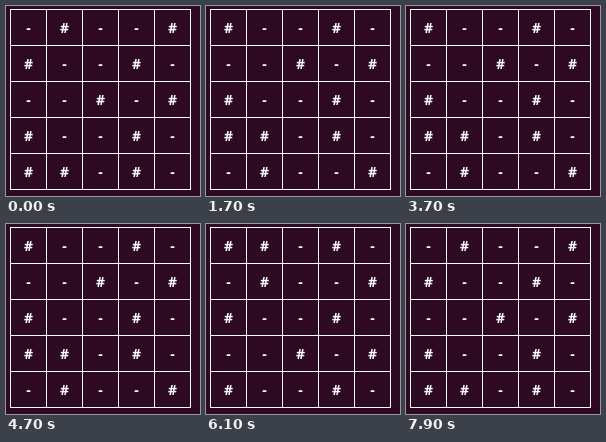
An HTML page for the animation above (8 s loop, 194 by 190 pixels).

```html
<!DOCTYPE html>
<html lang="en">
<head>
<meta charset="utf-8">
<title>Scrolling pattern</title>
<style>
  html, body { margin: 0; width: 100%; height: 100%; overflow: hidden; background: #2d0922; }
  svg { display: block; width: 194px; height: 190px; }
  path { stroke: #fff; fill: none; shape-rendering: crispEdges; }
  text { font: bold 14px "Open Sans", "Noto Sans", sans-serif; fill: #fff; text-anchor: middle; }
  #rows { animation: scroll 1s steps(5, end) -0.1s infinite; }
  @keyframes scroll { to { transform: translateY(180px); } }
</style>
</head>
<body>
<svg viewBox="0 0 194 190">
  <path id="grid"/>
  <g id="rows"></g>
</svg>
<script>
  const CELL = 36, LEFT = 4.5, TOP = 3.5;
  const pattern = ["-#--#", "#--#-", "--#-#", "#--#-", "##-#-"];

  let lines = "";
  for (let i = 0; i <= 5; i++) {
    lines += `M${LEFT + i * CELL} 3V184M4 ${TOP + i * CELL}H185`;
  }
  document.getElementById("grid").setAttribute("d", lines);

  // A second copy sits above the stage so the rows wrap around seamlessly.
  document.getElementById("rows").innerHTML = [...pattern, ...pattern].map((row, r) =>
    [...row].map((mark, c) =>
      `<text x="${LEFT + 18 + c * CELL}" y="${27 + (r - 5) * CELL}">${mark}</text>`
    ).join("")
  ).join("");
</script>
</body>
</html>
```
